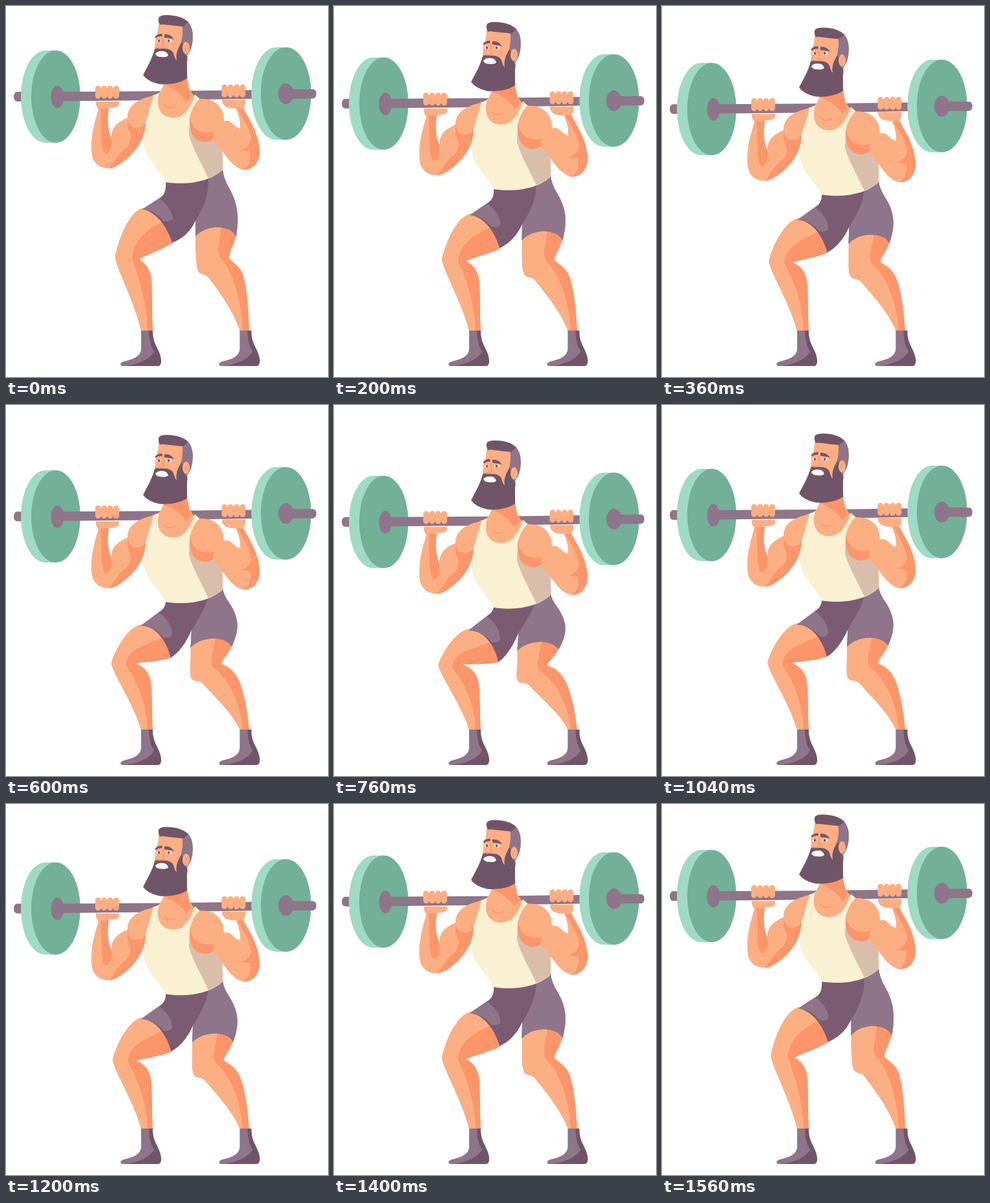
Animation, 498 px wide and 575 px high, one loop 1600 ms. Source, as an HTML page:

```html
<!DOCTYPE html>
<html lang="en">
<head>
<meta charset="utf-8">
<title>Barbell squat</title>
<style>
  html, body { margin: 0; width: 100%; height: 100%; overflow: hidden; background: #fff; }
  svg { display: block; width: 498px; height: 575px; }
  .skin { fill: #fcae83; }
  .shade { fill: #fd956a; }
  .mauve { fill: #8f7589; }
  .plum { fill: #7a5b72; }
  .hair { fill: #705568; }
  .mint { fill: #9fdac6; }
  .green { fill: #72b097; }
  .cream { fill: #faf0d2; }
  .beige { fill: #d9bfab; }
  .white { fill: #fff; }
  .line { fill: none; stroke: #fd956a; stroke-width: 1.5; stroke-linecap: round; }
</style>
</head>
<body>
<svg viewBox="0 0 498 575">
  <defs>
    <g id="sock">
      <path class="mauve" d="M209 503H227C226 525 239 532 240 550Q240 557 235 558H179Q174 554 182 551C198 547 208 543 209 532Z"/>
      <path class="hair" d="M221 503H227C226 525 239 532 240 550Q240 557 235 558H184C207 555 222 547 229 536Q221 524 221 503Z"/>
    </g>
    <g id="fingers" class="skin">
      <path class="shade" d="M141 128H172V140H141Z"/>
      <rect x="138" y="123.500" width="9" height="20" rx="4.500"/>
      <rect x="147.300" y="123.500" width="9" height="20" rx="4.500"/>
      <rect x="156.600" y="123.500" width="9" height="20" rx="4.500"/>
      <rect x="165.900" y="123.500" width="9" height="20" rx="4.500"/>
    </g>
  </defs>

  <g id="legs"></g>
  <use href="#sock"/>
  <use href="#sock" x="152.5"/>

  <g id="upper">
    <!-- barbell -->
    <path class="mauve" d="M24 133H17Q12 134 12 140.500T17 148H24Z"/>
    <path class="mint" d="M61 69H77V212H61A38 71.500 0 0 1 61 69Z"/>
    <ellipse class="green" cx="77" cy="140.500" rx="38" ry="71.500"/>
    <ellipse class="mauve" cx="79.500" cy="141" rx="10" ry="17.500"/>
    <path class="mauve" d="M80 133L240 132L400 130V143.500L240 146L80 147.500Z"/>
    <path class="mint" d="M418 64H433V207.500H418A38.500 71.700 0 0 1 418 64Z"/>
    <ellipse class="green" cx="433" cy="135.700" rx="39" ry="71.700"/>
    <path class="mauve" d="M433 129H475Q480 130 480 136T475 143.500H433Z"/>
    <ellipse class="mauve" cx="433" cy="136" rx="12" ry="16"/>

    <!-- torso -->
    <path class="skin" d="M246 112L280 104C281 125 284 133 293 141L288 180H232L228 140Q242 135 246 112Z"/>
    <path class="shade" d="M243 121L280 107C281 122 283 132 287 138Q284 144 279 148Q268 131 243 121Z"/>
    <path class="line" d="M245 153Q251 161 262 156"/>
    <path class="cream" d="M226 139L237 135C230 160 242 173 258 173C275 174 286 157 292 137L300 144L288 190L334 215C335 235 336 245 335 254C318 270 285 279 247 273C240 256 213 235 213 212C216 180 222 165 226 139Z"/>
    <path class="beige" d="M284 175L283 200C289 222 303 245 313 267Q326 262 335 254C336 240 335 230 334 210L300 190Z"/>

    <!-- arm on the left -->
    <path class="skin" d="M139 148H175V152Q174 158 159 158C156 178 157 190 163 205C162 185 178 178 188 173C188 155 202 145 228 139C222 158 220 170 215 183C216 212 190 236 176 245C157 258 137 250 133 232C129 207 137 180 143 160Q138 155 139 148Z"/>
    <path class="shade" d="M146 159H159C156 178 157 190 163 205C164 220 160 230 154 229C145 224 149 186 146 159Z"/>
    <path class="shade" d="M188 173C188 184 197 190 206 188Q212 187 216 180C216 212 190 236 176 245Q168 251 159 252C171 238 174 227 187 219C193 211 196 201 188 190Z"/>
    <path class="skin" d="M188 173C188 155 202 145 228 139C222 158 219 170 215 182Q210 189 202 189Q190 188 188 173Z"/>

    <!-- arm on the right -->
    <path class="skin" d="M299 144C322 142 338 157 337 178C337 196 325 210 308 210C290 208 284 192 284 178C285 162 291 153 299 144Z"/>
    <path class="shade" d="M284 168C286 193 304 200 324 194L320 207C306 216 293 208 288 199C284 190 284 180 284 168Z"/>
    <path class="skin" d="M334 145H370V150Q370 155 367 158C377 178 392 198 392 228C391 243 382 254 367 254C347 249 338 226 325 214Q318 208 321 197C325 184 336 176 344 178C352 182 354 188 362 190C363 176 359 168 356 159C341 159 334 155 334 145Z"/>
    <path class="shade" d="M358 159H367C377 178 392 198 392 228C391 243 382 254 367 254Q380 246 378 225L362 224Q374 221 379 209C380 192 366 176 358 159Z"/>

    <use href="#fingers"/>
    <use href="#fingers" x="195.500" y="-2"/>

    <!-- head -->
    <path class="skin" d="M236 27H276L282 85L240 95L229 72Q231 60 231 52Q236 40 236 27Z"/>
    <path class="mauve" d="M272 28L280 23Q289 31 289 47C289 62 285 72 279 77L270 60Q275 42 272 28Z"/>
    <path class="hair" d="M238 29Q234 22 237 17Q241 13 256 14.500Q273 16 282 25L274 32Q256 30 247 29Q242 28 238 29Z"/>
    <path class="hair" d="M230 67Q236 63 241 66Q255 65 259 73Q261 82 264 84C262 74 266 66 271 57L275 61V72L280 78V112C268 121 249 122 237 121Q219 117 212 107C219 93 226 82 230 67Z"/>
    <ellipse class="skin" cx="278.500" cy="65" rx="5.500" ry="9.500"/>
    <path class="line" d="M277 69Q278 60 281 61"/>
    <path class="white" d="M231 74Q234 70 240 70Q249 69 251 77Q247 80 241 79Q232 79 231 74Z"/>
    <path class="hair" d="M231 47Q235 43 241 43L242 47Q236 46 231 50ZM245 44Q255 43 260 52Q253 49 245 49Z"/>
    <ellipse class="white" cx="236" cy="54" rx="3" ry="2"/>
    <ellipse class="white" cx="252" cy="54" rx="4" ry="2.200"/>
    <circle class="hair" cx="236.500" cy="54" r="1.900"/>
    <circle class="hair" cx="251.500" cy="54" r="2"/>
    <path class="line" d="M243 50Q242 58 244 63Q239 67 234 65"/>
  </g>
</svg>
<script>
const PERIOD = 1600, STEP = 40, DEPTH = 43;
const legs = document.getElementById('legs');
const upper = document.getElementById('upper');

// Outlines shared by light and shaded areas: [standing, squatting]
const leftBack = [
  'H227C225 470 227 440 224 418C221 404 213 398 207 393C205 390 235 381 258 367',
  'H227C225 475 227 440 222 425C217 411 208 406 199 404C198 401 232 405 255 400'];
const rightBack = [
  'H376C375 470 373 440 367 418C362 402 352 400 345 391C343 386 352 372 356 355',
  'H376C373 475 366 445 357 428C348 412 340 408 330 405C327 400 342 392 347 378'];
const shortsSide = [
  'L293 357C310 338 345 338 356 357C361 325 358 305 345 282Q335 265 335 250Z',
  'L283 382C300 365 335 363 347 380C362 355 361 338 346 316Q335 302 335 293Z'];

// Each part: class, standing path, squatting path
const parts = [
  ['skin',
    `M211 313C190 320 174 360 169 388C167 400 200 460 209 504${leftBack[0]}L240 318Z`,
    `M208 349C188 352 168 384 161 402C158 412 198 465 209 504${leftBack[1]}L240 350Z`],
  ['shade',
    `M244 333C222 345 197 360 195 392C205 420 218 460 219 504${leftBack[0]}Z`,
    `M243 368C215 382 183 383 182 408C203 432 218 465 219 504${leftBack[1]}Z`],
  ['skin',
    `M293 350L293 375C294 395 294 410 300 414C306 418 310 416 314 422C335 450 352 475 362 504${rightBack[0]}L330 335Z`,
    `M283 378L283 400C281 420 281 427 285 430C290 433 296 430 301 435C325 460 350 480 362 504${rightBack[1]}L320 360Z`],
  ['shade',
    `M333 340C332 360 325 378 331 389C352 412 365 460 366 504${rightBack[0]}Z`,
    `M322 364C318 385 311 400 316 412C345 430 364 470 366 504${rightBack[1]}Z`],
  ['plum',
    `M247 268C248 285 246 293 237 298L211 315C235 320 250 345 257 367C272 361 284 352 293 333${shortsSide[0]}`,
    `M247 311C248 318 244 324 236 329L208 351C235 350 250 380 254 400C266 392 278 372 285 354${shortsSide[1]}`],
  ['mauve',
    `M313 262C314 295 306 312 293 333${shortsSide[0]}`,
    `M313 305C309 318 297 335 285 354${shortsSide[1]}`],
  ['mauve',
    'M211 315L237 298C250 308 257 318 258 330Q252 336 243 333C235 322 225 317 211 315Z',
    'M208 351L236 329C248 338 256 348 257 365Q252 372 243 369C235 358 222 352 208 351Z']
].map(([className, from, to]) => {
  const path = document.createElementNS('http://www.w3.org/2000/svg', 'path');
  path.setAttribute('class', className);
  legs.append(path);
  return { path, from, ends: to.match(/\d+/g) };
});

function draw() {
  const t = Math.floor(performance.now() / STEP) * STEP % PERIOD;
  const squat = 1 - Math.abs(1 - 2 * t / PERIOD);
  upper.setAttribute('transform', `translate(0 ${DEPTH * squat})`);
  for (const { path, from, ends } of parts) {
    let i = 0;
    path.setAttribute('d', from.replace(/\d+/g, n => +n + (ends[i++] - n) * squat));
  }
  requestAnimationFrame(draw);
}
draw();
</script>
</body>
</html>
```
